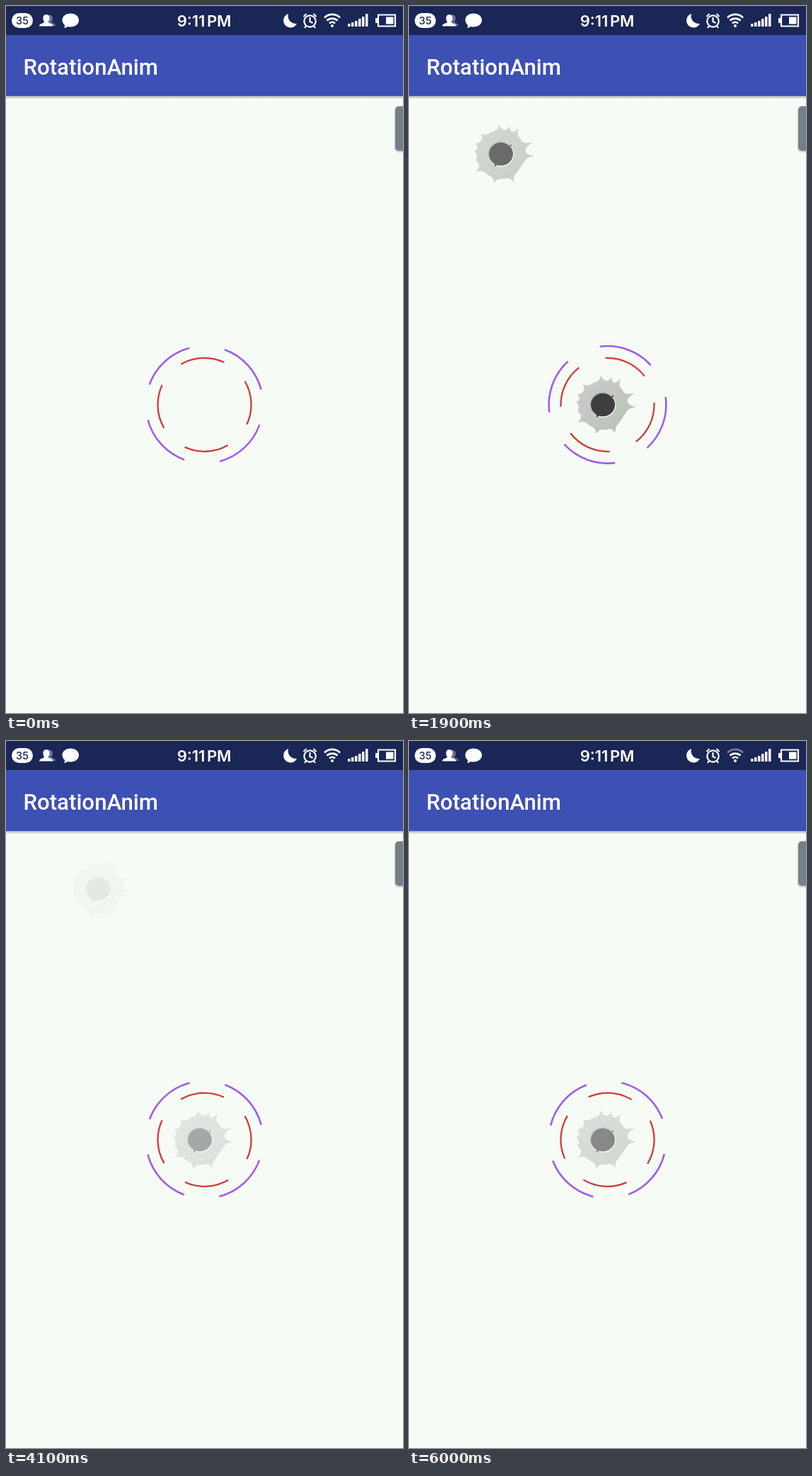
Write an HTML page that moves like this. It is 561 px wide and 998 px high and loops after 6100 ms.

```html
<!DOCTYPE html>
<html lang="en">
<head>
<meta charset="utf-8">
<title>RotationAnim</title>
<style>
  html, body { margin: 0; width: 100%; height: 100%; overflow: hidden; background: #f6fbf6; }
  svg { display: block; }
</style>
</head>
<body>
<svg width="561" height="998" viewBox="0 0 561 998">
  <defs>
    <linearGradient id="shade" x2="0" y2="1">
      <stop stop-color="#8e938f" stop-opacity=".7"/>
      <stop offset="1" stop-color="#8e938f" stop-opacity="0"/>
    </linearGradient>
    <linearGradient id="metal" x2="1" y2="1">
      <stop offset=".2" stop-color="#b9bcb7"/>
      <stop offset=".8" stop-color="#abafa9"/>
    </linearGradient>
    <linearGradient id="rim" x2="1" y2="1">
      <stop offset=".2" stop-color="#8f9299"/>
      <stop offset=".8" stop-color="#e4e6e6"/>
    </linearGradient>
    <g id="hole">
      <path id="splat" fill="url(#metal)"/>
      <circle r="18.500" fill="url(#rim)"/>
      <ellipse rx="17" ry="16.300"/>
      <path d="M-9 13l0 5 4-3zM12-12l3-2-1 4z"/>
    </g>
  </defs>

  <rect width="561" height="998" fill="#f6fbf6"/>
  <rect y="127" width="561" height="4.500" fill="url(#shade)"/>
  <rect y="40" width="561" height="87" fill="#3d50b3"/>
  <rect width="561" height="41" fill="#192656"/>
  <text x="24.500" y="96.500" font-family="Roboto, sans-serif" font-weight="500" font-size="31.200" fill="#fff">RotationAnim</text>

  <g fill="#fff">
    <rect x="8" y="10" width="30" height="21" rx="10.500"/>
    <text x="23" y="25.500" text-anchor="middle" font-family="Inter, sans-serif" font-weight="500" font-size="14.500" fill="#192656">35</text>
    <path fill="#667092" d="M60 13c4-1 6 1 6 5 0 2-1 3-2 4 0 2 6 2 6 6H60z"/>
    <path d="M57 12c3.500 0 5 3 4.500 6 0 2-1 3-2 4 0 3 7 2 7 6.500H47c0-4.500 7-3.500 7-6.500-1-1-1.500-2-1.500-4-.5-3 1-6 4.500-6z"/>
    <path d="M91 10.500c7 0 12 4 12 9.500s-5 9.500-12 9.500q-2 0-4-.5-2 2-5 2 1.500-2 1-4c-2-2-3.500-4-3.500-7 0-5.500 5-9.500 11.500-9.500z"/>
    <text x="280" y="28.500" text-anchor="middle" font-family="Inter, sans-serif" font-weight="600" font-size="22" word-spacing="-3">9:11 PM</text>
    <path d="M399 11a10 10 0 1 0 12 14A11 11 0 0 1 399 11z"/>
    <g fill="none" stroke="#fff" stroke-width="2.200">
      <circle cx="429.500" cy="21.500" r="8.200"/>
      <path d="M429.500 16v6l4 2M420.500 15l4-4M438.500 15l-4-4M424 28l-2 3M435 28l2 3"/>
      <g stroke-width="2.700">
        <path id="wifi" d="M450 16.500a15.500 15.500 0 0 1 22 0"/>
        <path d="M453.500 20.500a11 11 0 0 1 15 0M457 24.500a6 6 0 0 1 8 0"/>
      </g>
      <path d="M526 12.500h24v16h-24z"/>
    </g>
    <circle cx="461" cy="28" r="2"/>
    <path d="M483 25h3.500v4H483zM488 23h3.500v6H488zM493 21h3.500v8H493zM498 18h3.500v11H498zM503 15h3.500v14H503zM508 11h3.500v18H508z"/>
    <path d="M522 17h4v7h-4zM537 15.500h10.500v10H537z"/>
  </g>

  <rect x="548.500" y="143" width="20" height="64" rx="6" fill="#9aa3a8" opacity=".35"/>
  <rect x="550" y="141.500" width="20" height="63" rx="5" fill="#748089"/>

  <g id="shots"></g>
  <g fill="none" transform="translate(280.500 562.800)">
    <circle id="outer" r="82.800" pathLength="360" stroke-dasharray="55 35" stroke="#9f5de6" stroke-width="2.600"/>
    <circle id="inner" r="66" pathLength="360" stroke-dasharray="55 35" stroke="#cb3d3a" stroke-width="2.300"/>
  </g>
</svg>
<script>
const $ = id => document.getElementById(id);
const LOOP = 6.1, CYCLE = 2.35, RISE = 0.3;

// Round body whose edge sweeps out into thin curved spikes
const tips = [[47, 3], [45, -17], [25, -37], [12, -39], [-3, -42], [-28, -29], [-36, -15],
  [-38, -4], [-36, 9], [-36, 25], [-10, 41], [18, 40]];
const edge = (angle, r = 34.5) => `${r * Math.cos(angle) + 0.5} ${r * Math.sin(angle) + 0.5}`;
const spikes = tips.map(([x, y]) => {
  const a = Math.atan2(y, x);
  return `${edge(a + 0.2)}Q${edge(a + 0.06, 35)} ${x} ${y}Q${edge(a - 0.06, 35)} ${edge(a - 0.2)}`;
});
$('splat').setAttribute('d', 'M' + spikes.join('A34.5 34.5 0 0 0 ') + 'Z');

// x, y, first start, start and end of the fade-out (seconds of age)
const shots = [
  [274, 563, 1.675, 1.29, 2.54],
  [130, 209, 1.73, 0.65, 1.135],
  [474, 861, 1.9, 0.65, 1.135],
  [43, 861, 2.214, 0.65, 1.135],
  [81, 563, 2.385, 0.65, 1.135],
  [474, 296, 2.385, 0.65, 1.135],
].flatMap(([x, y, start, hold, end]) => [0, 1].map(turn => {
  const node = document.createElementNS('http://www.w3.org/2000/svg', 'use');
  node.setAttribute('href', '#hole');
  node.setAttribute('transform', `translate(${x} ${y})`);
  $('shots').append(node);
  return { node, start: start + turn * CYCLE, hold, end };
}));

// One turn: time in seconds, degrees
const turnKeys = [[0, 0], [0.45, 55.5], [1.15, 165], [1.3, 186], [1.9, 297.5], [2.25, 347], [CYCLE, 360]];

function angleAt(t) {
  const p = t % CYCLE;
  const i = turnKeys.findIndex(key => key[0] > p);
  const [t0, a0] = turnKeys[i - 1], [t1, a1] = turnKeys[i];
  return a0 + (a1 - a0) * (p - t0) / (t1 - t0);
}

const clamp = v => Math.max(0, Math.min(1, v));

function draw(now) {
  const t = Math.floor(now / 100 % (LOOP * 10)) / 10;
  const angle = angleAt(t);
  $('inner').setAttribute('transform', `rotate(${angle - 30})`);
  $('outer').setAttribute('transform', `rotate(${20 - angle})`);
  for (const { node, start, hold, end } of shots) {
    const age = t - start;
    node.setAttribute('opacity', Math.min(clamp(age / RISE), clamp((end - age) / (end - hold))));
  }
  $('wifi').setAttribute('opacity', (t > 2.3 && t < 4) || t > 5.3 ? 0.4 : 1);
}

const begin = performance.now();
(function tick() {
  draw(performance.now() - begin);
  requestAnimationFrame(tick);
})();
</script>
</body>
</html>
```
